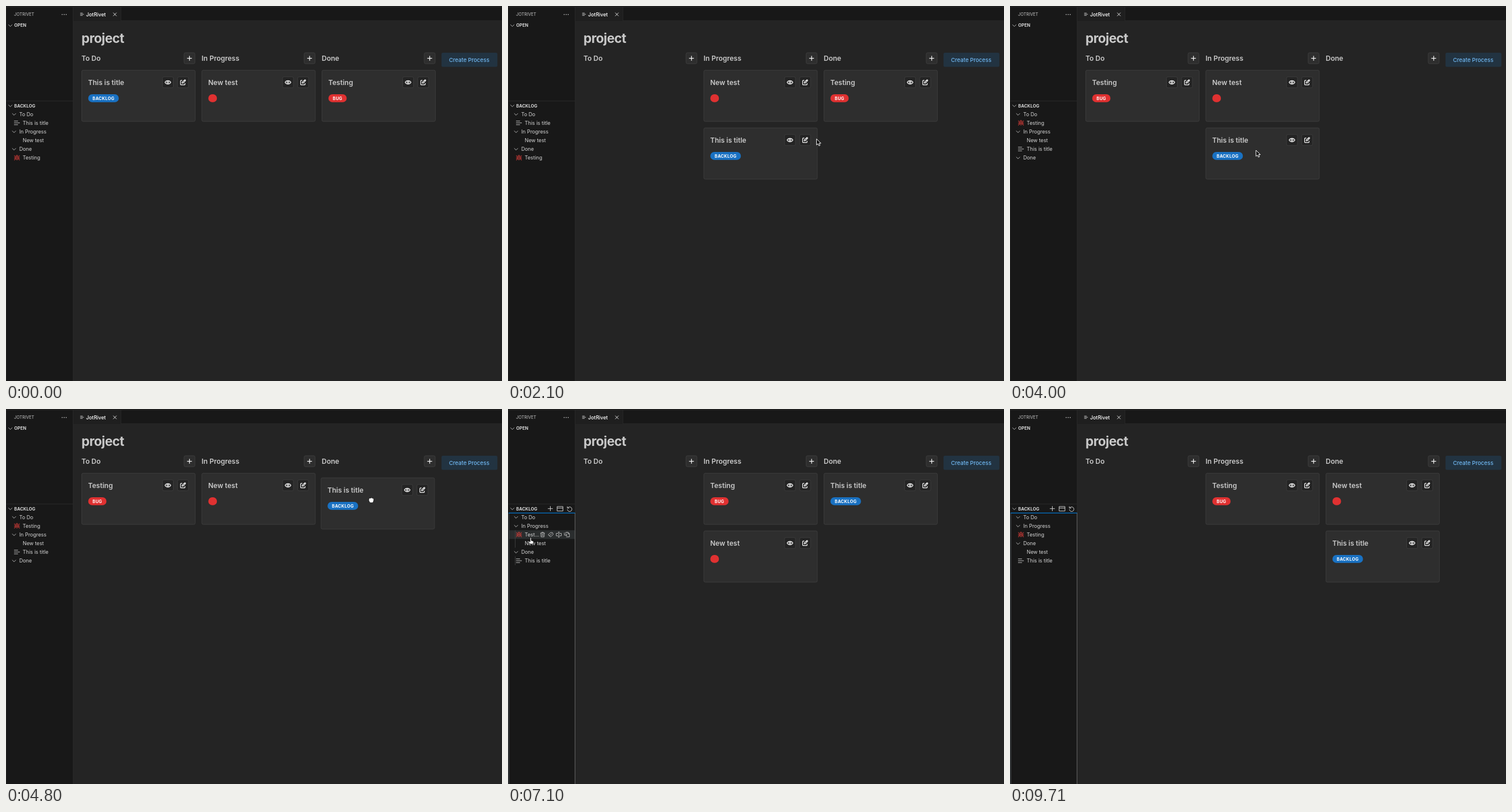
An HTML page with a canvas that plays this animation: 861x650 px, repeating every 9.82 s.

```html
<!DOCTYPE html>
<html lang="en">
<head>
<meta charset="utf-8">
<title>Kanban board</title>
<style>
  html, body { margin: 0; width: 100%; height: 100%; overflow: hidden; background: #242424; }
  canvas { display: block; width: 861px; height: 650px; }
</style>
</head>
<body>
<canvas id="stage"></canvas>
<script>
const canvas = document.getElementById('stage');
const dpr = window.devicePixelRatio || 1;
canvas.width = 861 * dpr;
canvas.height = 650 * dpr;
const ctx = canvas.getContext('2d');

const LOOP = 9820, STEP = 100;
const ROW_TOP = 180, ROW_H = 15.1;
const COLUMNS = ['To Do', 'In Progress', 'Done'];
const CARDS = {
  T: { title: 'This is title', short: 'Th...', badge: 'BACKLOG', color: '#1971c2', icon: 'lines' },
  N: { title: 'New test', short: 'Ne...', badge: '', color: '#e03131' },
  B: { title: 'Testing', short: 'Test...', badge: 'BUG', color: '#e03131', icon: 'bug' }
};

// Layouts list the cards of the three columns from top to bottom.
const BOARD = [[0, 'T,N,B'], [1900, ',NT,B'], [3100, 'B,NT,'], [5000, 'B,N,T'], [7100, ',BN,T'], [8300, ',B,NT']];
const TREE = [[0, 'T,N,B'], [2200, ',NT,B'], [3400, 'B,NT,'], [5200, 'B,N,T'], [7000, ',BN,T'], [8300, ',B,NT']];
const CARD_DRAGS = [
  { card: 'T', from: 700, to: 1900, col: 0, slot: 0 },
  { card: 'B', from: 2500, to: 3100, col: 2, slot: 0 },
  { card: 'T', from: 4100, to: 5000, col: 1, slot: 1 }
];
const TREE_DRAGS = [
  { card: 'B', from: 6500, to: 7000 },
  { card: 'N', from: 7600, to: 8300 }
];
const SETTLE = 200, FOCUS_FROM = 6500;

// Pointer path: time, x, y.
const PATH = [
  [300, 292, 18], [600, 277, 167], [700, 277, 167], [1000, 325, 226], [1400, 400, 279],
  [1600, 452, 281], [1900, 486, 268], [2400, 627, 161], [2500, 627, 161], [2900, 231, 187],
  [3100, 214, 172], [3600, 260, 185], [4000, 427, 250], [4100, 427, 250], [4800, 634, 158],
  [5000, 635, 151], [5400, 590, 165], [6100, 39, 202], [6400, 39, 202], [6900, 40, 219],
  [7400, 38, 233], [7600, 38, 233], [8100, 37, 249], [8900, 37, 249], [9100, -12, 240]
];

// Icons on a 24 unit grid.
const ICONS = {
  plus: 'M12 3v18M3 12h18',
  close: 'M5 5l14 14M19 5L5 19',
  chevron: 'M5 9l7 7 7-7',
  lines: 'M1 5h15M1 12h22M1 19h15',
  eye: 'M2 12C6 4 18 4 22 12C18 20 6 20 2 12ZM15 12a3 3 0 1 1-6 0a3 3 0 1 1 6 0',
  edit: 'M9 5H5a2 2 0 0 0-2 2v12a2 2 0 0 0 2 2h12a2 2 0 0 0 2-2v-4M20.5 6.5a2.1 2.1 0 0 0-3-3L9 12v3h3zM16 5l3 3',
  bug: 'M12 6a5 7 0 0 1 0 14a5 7 0 0 1 0-14M8 7c0-6 8-6 8 0M7 10L3 7V3M17 10l4-3V3M7 13H1M17 13h6M7 16l-4 2v4M17 16l4 2v4M9 10l6 6M15 10l-6 6',
  trash: 'M3 6h18M9 6V3h6v3M5 6l1 15h12l1-15M10 10v7M14 10v7',
  tag: 'M2 13L11 4h8l3 7-10 10zM7 17l9-9',
  split: 'M12 2v20M9 2h6M9 22h6M9 7H2v10h7M15 7h7v10h-7',
  file: 'M8 9V3h9l5 5v13H9M16 3v6h6M2 9v5h10M8 10l4 4-4 4M2 9V4',
  window: 'M1 4h22v17H1zM1 10h22',
  refresh: 'M3 3v7h7M4 10a9 9 0 1 1-1 5'
};
for (const name in ICONS) ICONS[name] = new Path2D(ICONS[name]);

const CURSORS = {
  arrow: new Path2D('M0 0V10.5L2.5 8.3L4.2 12L6 11.2L4.4 7.6H7.6Z'),
  fist: new Path2D('M-4 -1.5C-4 -4 -2 -4 -1.5 -3C0 -5 1.5 -4 2 -3C4 -4 4.6 -2 4.3 0C4 3 3 4 2 4.4H-2C-3 3 -5 1 -4 -1.5Z'),
  hand: new Path2D('M-1 0C-1 -1.5 1 -1.5 1 0V4L4.5 5C5.5 6 5 8 4 10H-1L-4 6.5C-4 5 -2.5 5 -1 6.5Z')
};

function rect(x, y, w, h, color) {
  ctx.fillStyle = color;
  ctx.fillRect(x, y, w, h);
}

function box(x, y, w, h, r, fill, stroke) {
  ctx.beginPath();
  ctx.roundRect(x, y, w, h, r);
  ctx.fillStyle = fill;
  ctx.fill();
  if (!stroke) return;
  ctx.strokeStyle = stroke;
  ctx.lineWidth = 0.8;
  ctx.stroke();
}

function setFont(size, weight, spacing = 0) {
  ctx.font = `${weight} ${size}px Inter, "Open Sans", sans-serif`;
  ctx.letterSpacing = spacing + 'px';
}

// y is the middle of the capitals.
function text(str, x, y, size, weight, color, spacing) {
  setFont(size, weight, spacing);
  ctx.fillStyle = color;
  ctx.fillText(str, x, y + size * 0.364);
}

function icon(name, x, y, size, color = '#cccccc', line = 1) {
  const k = size / 24;
  ctx.save();
  ctx.translate(x - size / 2, y - size / 2);
  ctx.scale(k, k);
  ctx.lineWidth = line / k;
  ctx.lineJoin = 'round';
  ctx.strokeStyle = color;
  ctx.stroke(ICONS[name]);
  ctx.restore();
}

function iconButton(name, x, y, size, fill) {
  box(x - 9.5, y - 9.5, 19, 19, 2.5, fill, '#424242');
  icon(name, x, y, size, '#f4f4f4', 1.25);
}

const layoutAt = (states, t) => states.filter(s => s[0] <= t).pop()[1].split(',');
const slotPos = (col, slot) => ({ x: 131 + 208.5 * col, y: 111.3 + 100 * slot });
const smooth = p => p * p * (3 - 2 * p);

function pointerAt(t) {
  const next = PATH.findIndex(k => k[0] > t);
  const [t1, x1, y1] = PATH[next < 0 ? PATH.length - 1 : next];
  const [t0, x0, y0] = PATH[next < 0 ? PATH.length - 1 : Math.max(0, next - 1)];
  const p = t1 > t0 ? smooth((t - t0) / (t1 - t0)) : 0;
  return {
    x: x0 + (x1 - x0) * p,
    y: y0 + (y1 - y0) * p,
    visible: t >= PATH[0][0] && next >= 0
  };
}

function dragPos(drag, t) {
  const start = pointerAt(drag.from), now = pointerAt(t), home = slotPos(drag.col, drag.slot);
  return { x: home.x + now.x - start.x, y: home.y + now.y - start.y };
}

function drawCard(id, { x, y }) {
  const { title, badge, color } = CARDS[id];
  box(x + 0.4, y, 197, 88.8, 2.5, '#2e2e2e', '#424242');
  text(title, x + 11.5, y + 21, 12, 600, '#c9c9c9');
  iconButton('eye', x + 150, y + 21, 12, '#242424');
  iconButton('edit', x + 176.3, y + 21, 11.5, '#242424');
  setFont(7.3, 700, 0.35);
  const width = ctx.measureText(badge).width + 15;
  box(x + 11.7, y + 41.7, width, 13.8, 6.9, color);
  text(badge, x + 19.2, y + 48.7, 7.3, 700, '#ffffff', 0.35);
}

function drawBoard(t) {
  text('project', 131, 56, 22.5, 700, '#c9c9c9', -0.5);
  COLUMNS.forEach((name, i) => {
    const x = 131 + 208.5 * i;
    text(name, x, 90.5, 12, 600, '#c9c9c9');
    iconButton('plus', x + 187.5, 90.5, 11, '#2e2e2e');
  });
  box(756, 81, 97, 24.5, 2.5, '#223341');
  text('Create Process', 769, 93.4, 9.6, 500, '#70b8f2');

  const active = CARD_DRAGS.find(d => t >= d.from && t < d.to + SETTLE);
  let lifted = null;
  layoutAt(BOARD, t).forEach((ids, col) => [...ids].forEach((id, slot) => {
    const home = slotPos(col, slot);
    if (!active || active.card !== id) return drawCard(id, home);
    lifted = dragPos(active, Math.min(t, active.to));
    if (t >= active.to) {
      const p = 1 - (1 - (t - active.to) / SETTLE) ** 2;
      lifted.x += (home.x - lifted.x) * p;
      lifted.y += (home.y - lifted.y) * p;
    }
  }));
  if (lifted) drawCard(active.card, lifted);
}

function treeRows(t) {
  return layoutAt(TREE, t).flatMap((ids, group) =>
    [{ group }, ...[...ids].map(id => ({ group, id }))]);
}

function drawTree(t, pointer, drag) {
  const rows = treeRows(t);
  const hovering = pointer.visible && pointer.x > 0 && pointer.x < 116;
  const under = Math.floor((pointer.y - ROW_TOP) / ROW_H);
  const target = drag && rows[under] ? rows[under].group : -1;

  rows.forEach(({ group, id }, i) => {
    const top = ROW_TOP + i * ROW_H, y = top + 7.5;
    const hovered = hovering && !drag && i === under;
    if (group === target) rect(1, top, 115, ROW_H + 0.1, '#383b3d');
    else if (hovered) rect(1, top, 115, ROW_H, '#2a2d2e');
    if (!id) {
      icon('chevron', 14, y, 11, '#c5c5c5', 0.9);
      text(COLUMNS[group], 23, y, 8.8, 400, '#d4d4d4');
      return;
    }
    const item = CARDS[id];
    const actions = drag ? drag.card === id : hovered;
    if (hovering) rect(12, top, 0.8, ROW_H, '#454545');
    if (item.icon) icon(item.icon, 19, y, 11, item.icon === 'bug' ? '#e5403c' : '#cccccc', 0.9);
    text(actions ? item.short : item.title, 29, y, 8.8, 400, '#d4d4d4');
    if (actions) ['trash', 'tag', 'split', 'file'].forEach((name, k) =>
      icon(name, 60 + 14.1 * k, y, 10.5, '#cccccc', 0.85));
  });

  if (hovering || t >= FOCUS_FROM) {
    icon('plus', 73.5, 172.7, 11.5);
    icon('window', 90.3, 172.7, 11);
    icon('refresh', 107, 172.7, 10.5);
  }
  if (t >= FOCUS_FROM) {
    rect(1, 180, 1, 470, '#44494d');
    rect(115.8, 180, 1, 470, '#666666');
    rect(1, 179.7, 115.5, 1.2, '#0078d4');
  }
}

function drawChrome() {
  rect(0, 0, 861, 650, '#242424');
  rect(0, 0, 117, 650, '#181818');
  rect(117, 0, 744, 26, '#181818');
  rect(117, 25, 744, 0.8, '#2b2b2b');
  rect(117, 2, 82, 24, '#1f1f1f');
  rect(199, 2, 0.8, 23, '#2b2b2b');
  rect(0, 1, 861, 0.9, '#2d2d2d');
  rect(0, 1, 0.8, 649, '#262626');
  rect(116, 2, 0.9, 648, '#2b2b2b');
  rect(0, 164.4, 116, 0.8, '#2f2f2f');

  text('JOTRIVET', 14, 14.5, 7.3, 400, '#c4c4c4');
  [97.5, 101, 104.5].forEach(x => rect(x - 0.7, 14, 1.4, 1.4, '#cccccc'));
  icon('lines', 132, 14.3, 7, '#cccccc', 0.9);
  text('JotRivet', 139, 14.3, 8.8, 500, '#ffffff');
  icon('close', 189, 14.5, 10, '#dddddd', 1);
  icon('chevron', 7.5, 33.7, 11, '#c5c5c5', 0.9);
  text('OPEN', 14.3, 33.7, 7.5, 700, '#d4d4d4');
  icon('chevron', 7.5, 172.8, 11, '#c5c5c5', 0.9);
  text('BACKLOG', 14.3, 172.8, 7.5, 700, '#d4d4d4');
}

function drawPointer(t, pointer, treeDrag) {
  if (!pointer.visible) return;
  const { x, y } = pointer;
  if (treeDrag) {
    const { title } = CARDS[treeDrag.card];
    setFont(8.3, 600);
    box(x + 2, y + 1.3, ctx.measureText(title).width + 7, 12.6, 6, '#0b3a5c', '#1c5f91');
    text(title, x + 5, y + 7.8, 8.3, 600, '#c4d6e4');
  }
  const fist = CARD_DRAGS.some((d, i) => i && t >= d.from && t < d.to);
  const kind = fist ? 'fist' : x < 116 && !treeDrag ? 'hand' : 'arrow';
  const arrow = kind === 'arrow';
  ctx.save();
  ctx.translate(x, y);
  ctx.lineWidth = arrow ? 1 : 0.7;
  ctx.fillStyle = arrow ? '#000000' : '#ffffff';
  ctx.strokeStyle = arrow ? '#ffffff' : '#000000';
  ctx.fill(CURSORS[kind]);
  ctx.stroke(CURSORS[kind]);
  ctx.restore();
}

function draw(now) {
  const t = Math.floor((now % LOOP) / STEP) * STEP;
  const pointer = pointerAt(t);
  const treeDrag = TREE_DRAGS.find(d => t >= d.from && t < d.to);
  ctx.setTransform(dpr, 0, 0, dpr, 0, 0);
  drawChrome();
  drawBoard(t);
  drawTree(t, pointer, treeDrag);
  drawPointer(t, pointer, treeDrag);
}

const startTime = performance.now();
function tick() {
  draw(performance.now() - startTime);
  requestAnimationFrame(tick);
}
tick();
</script>
</body>
</html>
```
